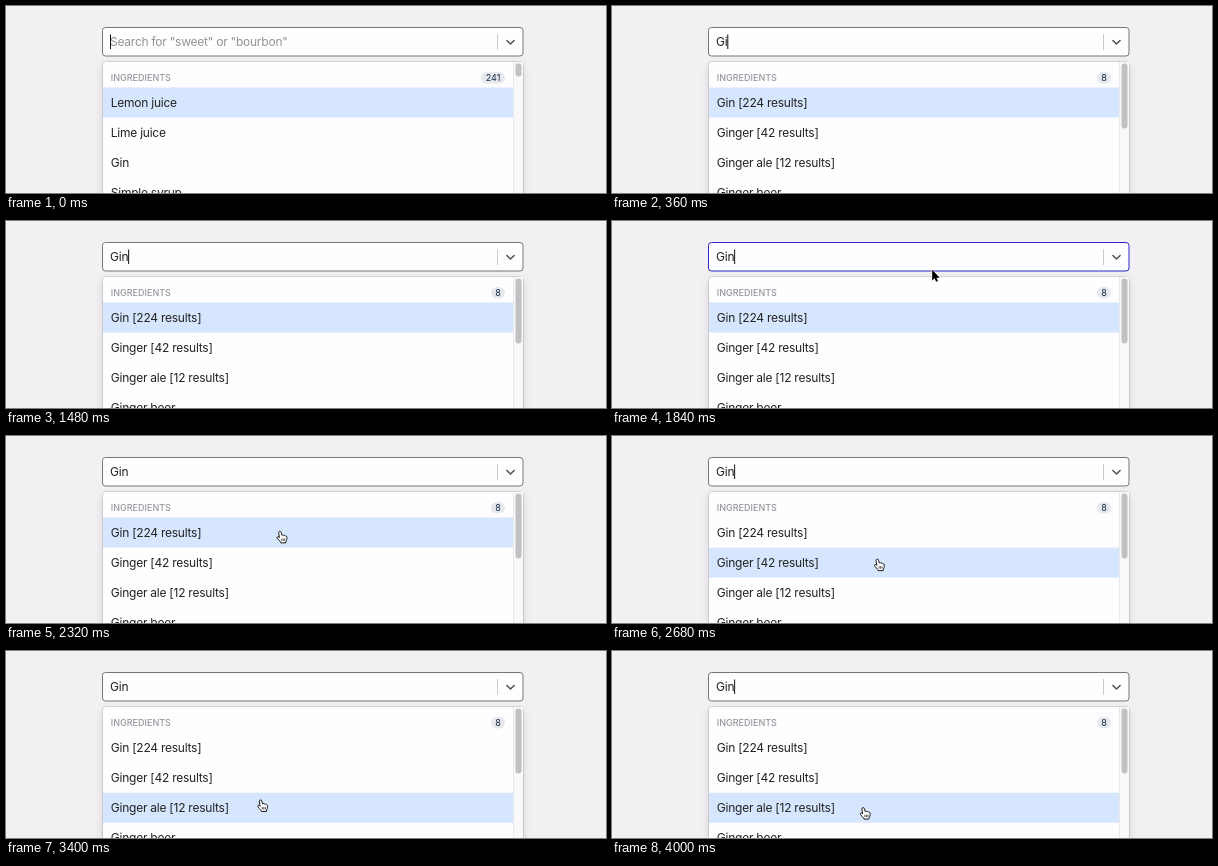
Animation, 600 px wide and 187 px high, one loop 4.08 s. Source, as an HTML page:

```html
<!DOCTYPE html>
<html lang="en">
<head>
<meta charset="utf-8">
<title>Ingredient search</title>
<style>
  html, body { margin: 0; width: 100%; height: 100%; overflow: hidden; background: #f2f0f2; }
  svg { display: block; width: 600px; height: 187px; }
  text { font: 12px Inter, Roboto, sans-serif; letter-spacing: -.02em; fill: #222; white-space: pre; }
  .hint { fill: #939295; }
  .label { font-size: 9px; font-weight: 500; letter-spacing: 0; fill: #98979b; }
  .count { font-size: 9px; letter-spacing: 0; fill: #172b4d; text-anchor: middle; }
  .menu { fill: #fefdff; filter: drop-shadow(0 3px 4px rgba(0, 0, 0, .13)); }
</style>
</head>
<body>
<svg viewBox="0 0 600 187">
  <rect width="600" height="187" fill="#f2f0f2"/>
  <rect class="menu" x="97" y="56" width="420" height="225" rx="3"/>
  <rect x="96.5" y="55.5" width="421" height="226" rx="3.5" fill="none" stroke="#000" stroke-opacity=".1"/>
  <rect x="508" y="56" width="9" height="131" fill="#faf9fa"/>
  <path d="M507.5 56V187" stroke="#e9e8ea"/>
  <rect id="thumb" x="509.5" y="57.5" width="6" rx="3" fill="#c1c0c2"/>
  <rect id="active" x="97" width="410" height="30" fill="#d6e6fe"/>
  <text class="label" x="104.8" y="75">INGREDIENTS</text>
  <rect id="badge" y="66" height="11.5" rx="5.75" fill="#e6e8ec"/>
  <text id="count" class="count" y="75"></text>
  <g id="rows"></g>
  <rect id="control" x="96.5" y="21.5" width="420.5" height="28.5" rx="3" fill="#fefdff"/>
  <text id="hint" class="hint" x="104" y="40">Search for "sweet" or "bourbon"</text>
  <text id="query" x="104" y="40"></text>
  <path id="caret" d="M0 28.5V43" stroke="#111"/>
  <path d="M491.5 28V44" stroke="#cbcacd"/>
  <path d="M500.9 34.5l3.6 3.5 3.6-3.5" fill="none" stroke="#555" stroke-width="1.6" stroke-linecap="round" stroke-linejoin="round"/>
  <g id="arrow">
    <path d="M0 0V10.6L2.4 8.4 4 12 5.8 11.2 4.3 7.8H7.5Z" stroke="#fff" stroke-width="1" paint-order="stroke"/>
  </g>
  <g id="hand" fill="#fff" stroke="#111" stroke-width=".95" stroke-linejoin="round">
    <path d="M-1.5 1.4C-1.6-.2 .8-.4 1 1.2L1.7 4C2.4 3.4 3.3 3.6 3.6 4.3 4.3 3.8 5.1 4 5.4 4.8 6.2 4.6 6.7 5.1 6.7 6 6.8 8 6.4 9 5.8 10L5.6 11.6H.6L.3 10.6C-1 9.4-2 8-3 6.8-3.6 5.9-2.4 5-1.5 5.7L-.8 6.4Z"/>
    <path d="M1.5 7.2v2.4M3 7.2v2.4M4.5 7.2v2.4" stroke-width=".7"/>
  </g>
</svg>
<script>
const LOOP = 4080, ROW_TOP = 81.5, ROW_STEP = 30.1;
const $ = id => document.getElementById(id);
const set = (id, attrs) => { for (const k in attrs) $(id).setAttribute(k, attrs[k]); };
const show = (id, on) => set(id, { visibility: on ? 'visible' : 'hidden' });
const clamp = v => Math.min(1, Math.max(0, v));

const gin = ['Gin [224 results]', 'Ginger [42 results]', 'Ginger ale [12 results]', 'Ginger beer'];
const states = [
  { at: 0, query: '', count: 241, thumb: 13, rows: ['Lemon juice', 'Lime juice', 'Gin', 'Simple syrup'] },
  { at: 40, query: 'G', count: 36, thumb: 18, rows: [gin[0], 'Grenadine [96 results]', 'Grapefruit juice [58 results]', 'Ginger'] },
  { at: 240, query: 'Gi', count: 8, thumb: 65, rows: gin },
  { at: 440, query: 'Gin', count: 8, thumb: 65, rows: gin }
];

// Pointer legs: start time, end time, target x, target y, easing.
const easeOut = p => 1 - (1 - p) ** 2;
const easeInOut = p => p * p * (3 - 2 * p);
const start = [334, 17];
const legs = [
  [1700, 1840, 320.5, 48.5, p => p],
  [1840, 2120, 274.2, 95.3, easeOut],
  [2460, 2760, 263.8, 128.8, easeInOut],
  [3100, 3560, 251.4, 156.5, easeInOut]
];

const rows = states[0].rows.map((_, i) => {
  const row = document.createElementNS('http://www.w3.org/2000/svg', 'text');
  row.setAttribute('x', 104.8);
  row.setAttribute('y', 100.6 + i * ROW_STEP);
  return $('rows').appendChild(row);
});

function pointer(t) {
  let [x, y] = start;
  for (const [from, to, tx, ty, ease] of legs) {
    const p = ease(clamp((t - from) / (to - from)));
    x += (tx - x) * p;
    y += (ty - y) * p;
  }
  return { x, y };
}

let current;
function showState(state) {
  if (state === current) return;
  current = state;
  $('query').textContent = state.query;
  show('hint', !state.query);
  rows.forEach((row, i) => row.textContent = state.rows[i]);
  const width = 9 + 5 * String(state.count).length;
  set('badge', { x: 499 - width, width });
  set('count', { x: 499 - width / 2 });
  $('count').textContent = state.count;
  set('thumb', { height: state.thumb });
}

function mix(a, b, p) {
  return `rgb(${a.map((v, i) => Math.round(v + (b[i] - v) * p))})`;
}

function draw(t) {
  showState(states.filter(s => s.at <= t).pop());
  const caretX = current.query ? 104.4 + $('query').getComputedTextLength() : 104.5;
  set('caret', { transform: `translate(${caretX})` });
  show('caret', t < 960 || Math.floor((t - 960) / 508) % 2 === 1);

  const { x, y } = pointer(t);
  const place = { transform: `translate(${x.toFixed(2)} ${y.toFixed(2)})` };
  const moving = t >= 1720, linked = t >= 2320;
  set('arrow', place);
  set('hand', place);
  show('arrow', moving && !linked);
  show('hand', linked);

  const hover = clamp((t - 1720) / 100) * (1 - clamp((t - 1850) / 100));
  set('control', { stroke: mix([118, 117, 120], [42, 38, 190], hover) });

  const row = Math.max(0, Math.floor((y - 2 - ROW_TOP) / ROW_STEP));
  set('active', { y: ROW_TOP + row * ROW_STEP });
}

function tick() {
  draw(performance.now() % LOOP);
  requestAnimationFrame(tick);
}
tick();
</script>
</body>
</html>
```
